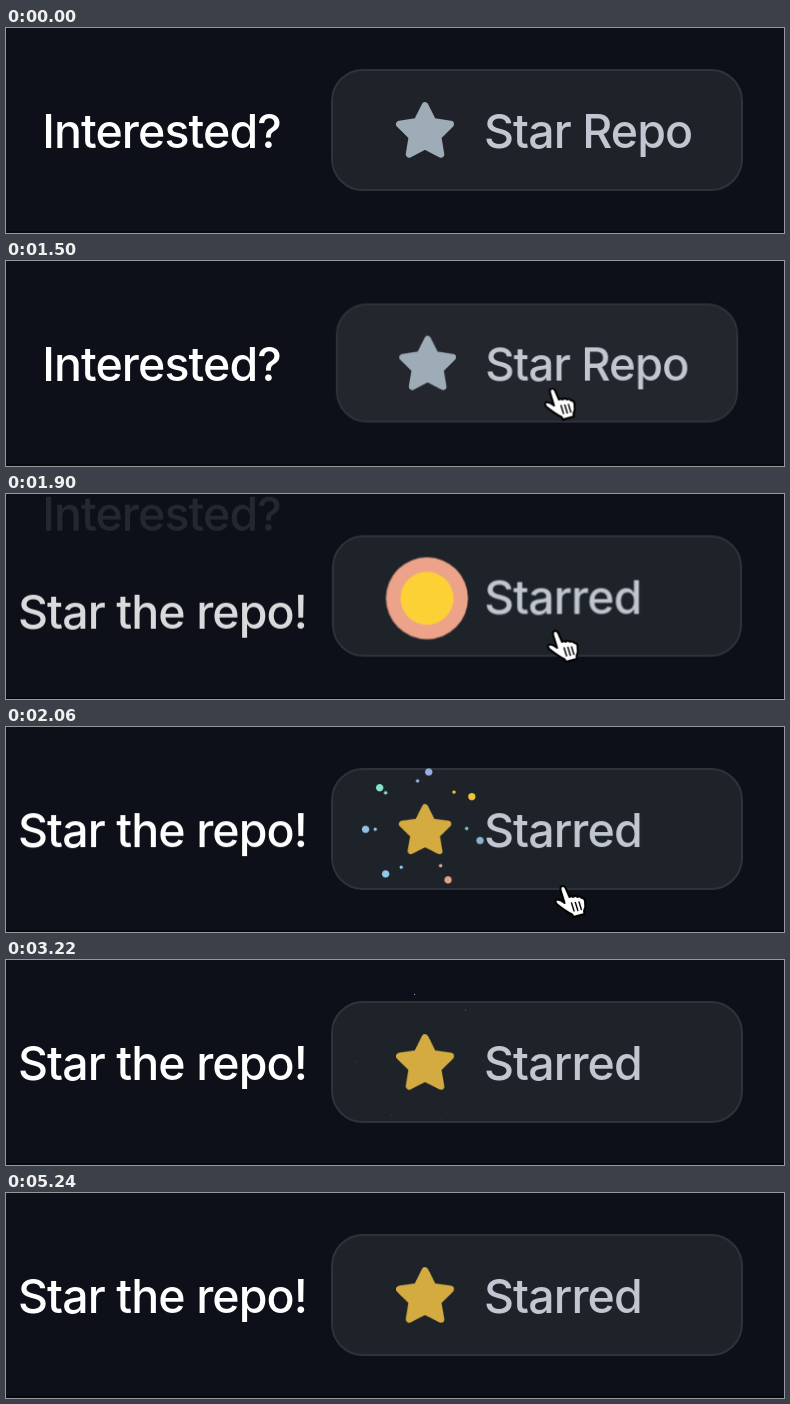
An HTML page for the animation above (5.26 s loop, 778x205 px).

```html
<!DOCTYPE html>
<html lang="en">
<head>
<meta charset="utf-8">
<title>Star button</title>
<style>
  html, body { margin: 0; width: 100%; height: 100%; overflow: hidden; background: #0d1018; }
  svg { display: block; width: 778px; height: 205px; }
  text { font: 500 46.5px Inter, "Open Sans", sans-serif; letter-spacing: -.92px; fill: #fff; }
  .label { fill: #c1c6d0; }

  .prompt, .thanks, .press, .face, .todo, .done, .halo, .core, .hole, .gold, .cursor, .dot, .speck {
    animation: 5260ms linear infinite;
  }

  .prompt { animation-name: roll-out, fade-out; }
  .thanks { animation-name: roll-in; }
  @keyframes roll-out {
    0%, 31.94% { transform: none; animation-timing-function: ease; }
    39.54%, 100% { transform: translateY(-98px); }
  }
  @keyframes fade-out {
    0%, 31.94% { opacity: 1; animation-timing-function: ease; }
    38.7%, 100% { opacity: 0; }
  }
  @keyframes roll-in {
    0%, 31.94% { transform: translateY(98px); opacity: 0; animation-timing-function: ease; }
    39.54%, 100% { transform: none; opacity: 1; }
  }

  .press { transform-origin: 531.5px 101.5px; animation-name: press; }
  @keyframes press {
    0%, 25.1% { transform: none; animation-timing-function: ease; }
    31.94% { transform: scale(.971); animation-timing-function: ease; }
    39.54%, 100% { transform: none; }
  }
  .face { animation-name: face; }
  @keyframes face {
    0%, 22% { fill: #20222a; }
    27%, 31.93% { fill: #23262d; }
    36%, 100% { fill: #1e232a; }
  }

  .todo { animation-name: before; }
  .done { animation-name: after; }
  @keyframes before { 0%, 31.93% { opacity: 1; } 31.94%, 100% { opacity: 0; } }
  @keyframes after { 0%, 31.93% { opacity: 0; } 31.94%, 100% { opacity: 1; } }

  .halo, .core, .hole { transform-origin: 420.5px 104.2px; }
  .gold { transform-origin: 419px 103.5px; }
  .halo { animation-name: halo; }
  .core { animation-name: core; }
  .hole { animation-name: hole; }
  .gold { animation-name: pop; }
  @keyframes halo {
    0%, 32.3% { transform: scale(0); animation-timing-function: ease-out; }
    35.7%, 39.15% { transform: none; }
    39.16%, 100% { transform: scale(0); }
  }
  @keyframes core {
    0%, 34.2% { transform: scale(0); }
    37.2%, 39.15% { transform: none; }
    39.16%, 100% { transform: scale(0); }
  }
  @keyframes hole {
    0%, 37% { transform: scale(0); animation-timing-function: ease-out; }
    39.15% { transform: none; }
    39.16%, 100% { transform: scale(0); }
  }
  @keyframes pop {
    0%, 37.2% { transform: scale(0); animation-timing-function: ease-out; }
    40.5% { transform: scale(1.15); animation-timing-function: ease-in-out; }
    43.5%, 100% { transform: none; }
  }

  .dot { animation-name: fly; }
  .speck { animation-name: drift; }
  @keyframes fly {
    0%, 37.4% { transform: translate(calc(var(--x) * .4), calc(var(--y) * .4)) scale(0); animation-timing-function: ease-out; }
    40% { transform: translate(calc(var(--x) * .8), calc(var(--y) * .8)) scale(1.3); animation-timing-function: ease-out; }
    45.63% { transform: translate(var(--x), var(--y)); }
    60%, 100% { transform: translate(calc(var(--x) * 1.05), calc(var(--y) * 1.05)) scale(0); }
  }
  @keyframes drift {
    0%, 37.4% { transform: translate(calc(var(--x) * .4), calc(var(--y) * .4)) scale(0); animation-timing-function: ease-out; }
    40% { transform: translate(calc(var(--x) * .8), calc(var(--y) * .8)) scale(2.5); animation-timing-function: ease-out; }
    45.63% { transform: translate(var(--x), var(--y)); }
    61.2% { transform: translate(calc(var(--x) * 1.04), calc(var(--y) * 1.04)) scale(.6); }
    66%, 100% { transform: translate(calc(var(--x) * 1.05), calc(var(--y) * 1.05)) scale(0); }
  }

  .cursor { animation-name: cursor; }
  @keyframes cursor {
    0%, 20% { transform: translate(572px, 212px); animation-timing-function: ease-out; }
    27%, 34% { transform: translate(543.5px, 127.5px); animation-timing-function: ease-in; }
    36.12% { transform: translate(546.5px, 136.8px); animation-timing-function: ease-in; }
    42.5%, 100% { transform: translate(572px, 212px); }
  }
</style>
</head>
<body>
<svg viewBox="0 0 778 205">
  <defs>
    <path id="star" stroke-width="7" stroke-linejoin="round"/>
  </defs>
  <rect width="778" height="205" fill="#0d1018"/>
  <rect y="203" width="778" height="2" fill="#08090e"/>

  <text class="prompt" x="36.2" y="120.4">Interested?</text>
  <text class="thanks" x="12" y="120.4">Star the repo!</text>

  <g class="press">
    <rect class="face" x="326" y="42" width="410" height="120" rx="31" stroke="#2f323a" stroke-width="2"/>
    <g class="todo">
      <use href="#star" fill="#9eacb7" stroke="#9eacb7"/>
      <text class="label" x="478" y="120.4">Star Repo</text>
    </g>
    <g class="done">
      <circle class="halo" cx="420.5" cy="104.2" r="41.2" fill="#eda38a"/>
      <circle class="core" cx="420.5" cy="104.2" r="41.2" fill="#fcd136"/>
      <circle class="hole" cx="420.5" cy="104.2" r="41.7" fill="#1e232a"/>
      <use class="gold" href="#star" fill="#d4ab40" stroke="#d4ab40"/>
      <text class="label" x="478" y="120.4">Starred</text>
    </g>
  </g>

  <g id="burst" transform="translate(419 103)"></g>

  <g class="cursor" stroke="#000" stroke-linejoin="round" stroke-linecap="round">
    <path fill="#fff" stroke-width="2" d="M.5 4Q0 0 2.5 0Q5 0 6 3L9.5 11Q11 9.5 13 11Q15 9 17.5 11Q19.5 9.5 21.5 12Q25 12 25 16Q26 21 24 25L24.5 28L13.5 31L12 28.5Q5 25-3.5 18Q-6 14-2.5 13.5Q1 14 4.5 17Z"/>
    <path fill="none" stroke-width="1.4" d="M11.5 17l2.5 8M15.3 16.5l2.5 8M19 16l2.3 7.5"/>
  </g>
</svg>
<script>
  // Five-pointed star with rounded tips.
  const points = Array.from({ length: 10 }, (_, i) => {
    const r = i % 2 ? 13.5 : 26.8;
    const a = (i / 5 - 0.5) * Math.PI;
    return `${419 + r * Math.cos(a)} ${104.5 + r * Math.sin(a)}`;
  });
  document.getElementById("star").setAttribute("d", `M${points.join("L")}Z`);

  const burst = document.getElementById("burst");
  function addParticle(kind, r, x, y, fill) {
    const c = document.createElementNS(burst.namespaceURI, "circle");
    c.setAttribute("class", kind);
    c.setAttribute("r", r);
    c.setAttribute("fill", fill);
    c.style.setProperty("--x", `${x}px`);
    c.style.setProperty("--y", `${y}px`);
    burst.append(c);
  }

  const dots = [
    [5, -78, "#96afe0"], [63, -45, "#f2c335"], [74, 14, "#86b6cf"], [31, 67, "#dfa189"],
    [-53, 59, "#92c8ec"], [-80, -1, "#92bfe2"], [-61, -57, "#86e2c2"]
  ];
  const specks = [[-10, -66], [39, -51], [56, -2], [21, 48], [-32, 50], [-67, -1], [-53, -50]];
  dots.forEach(([x, y, fill]) => addParticle("dot", 3.3, x, y, fill));
  specks.forEach(([x, y], i) => addParticle("speck", 0.8, x, y, dots[i][2]));
</script>
</body>
</html>
```
